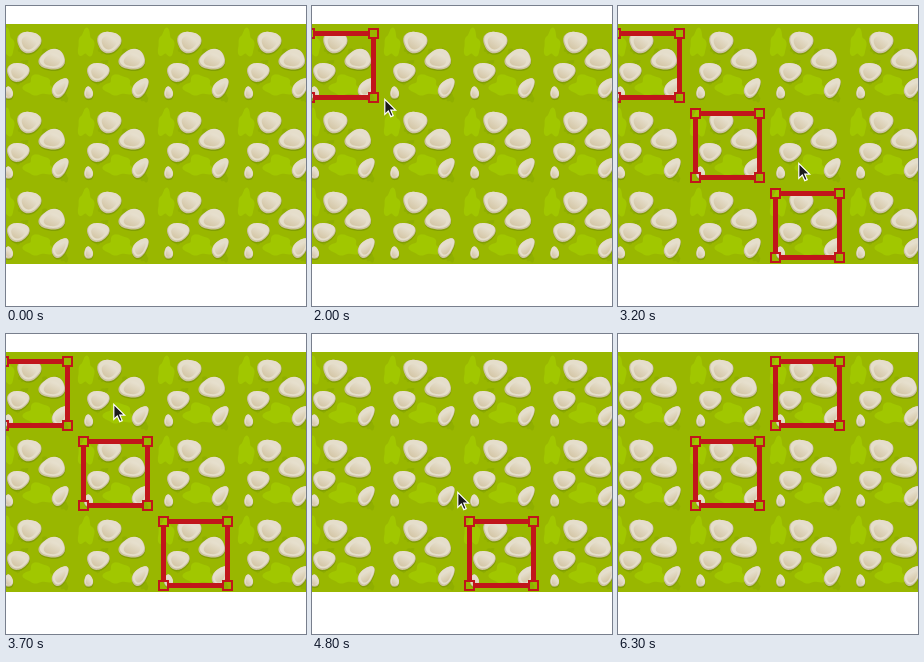
Animation of 300x300 px, one loop 6.8 s. Source, as an HTML page with a canvas:

```html
<!DOCTYPE html>
<html lang="en">
<head>
<meta charset="utf-8">
<title>Tile selection</title>
<style>
  html, body { margin: 0; width: 100%; height: 100%; overflow: hidden; background: #fff; }
  canvas { display: block; width: 300px; height: 300px; }
</style>
</head>
<body>
<canvas id="stage" width="300" height="300"></canvas>
<script>
const LOOP = 6800, STEP = 100, TILE = 80, LEFT = -10, TOP = 18, ROWS = 3, COLS = 4;
const TAU = Math.PI * 2;
const ctx = document.getElementById('stage').getContext('2d');

// Pointer visits: where it enters, then moves of [leave, arrive, x, y].
const visits = [
  { from: 300, until: 600, x: 46, y: 86, moves: [[300, 400, 58, 85]] },
  { from: 1000, until: 6300, x: 7, y: 77, moves: [
    [1000, 1300, 40, 73],
    [1800, 2200, 104, 111],
    [2400, 2600, 161, 176],
    [2600, 2800, 167, 198],
    [3100, 3300, 192, 113],
    [3400, 3700, 107, 69],
    [3800, 4100, 46, 90],
    [4300, 4700, 145, 157],
    [4900, 5000, 168, 198],
    [5100, 5300, 174, 160],
    [5400, 5600, 168, 62],
    [5700, 6000, 120, 115],
    [6100, 6200, 97, 16]
  ] }
];

// Each click toggles the tile under the pointer.
const clicks = [1500, 2300, 3000, 4200, 4800, 5100, 5700, 6100];

const stones = [
  { x: 23, y: 36, rx: 12, ry: 10.7, tilt: 0, corner: 1.75 },
  { x: 46.3, y: 53.7, rx: 13.2, ry: 10.2, tilt: -0.15, corner: 0.9 },
  { x: 12, y: 66, rx: 11.2, ry: 9.3, tilt: -0.1, corner: -0.25 },
  { x: 54.2, y: 82, rx: 11, ry: 6.6, tilt: -0.95, corner: 0.2 },
  { x: 2.5, y: 87, rx: 4.4, ry: 6, tilt: -0.1, corner: 0.5 }
];

function makeRandom(seed) {
  return () => (seed = (seed * 16807) % 2147483647) / 2147483647;
}

function fillShape(c, color, radius) {
  c.beginPath();
  for (let a = 0; a < TAU; a += TAU / 60) {
    const r = radius(a);
    c.lineTo(r * Math.cos(a), r * Math.sin(a));
  }
  c.closePath();
  c.fillStyle = color;
  c.fill();
}

function stoneLayer(c, s, color, scale, dx, dy) {
  c.save();
  c.translate(s.x + dx, s.y + dy);
  c.rotate(s.tilt);
  c.scale(s.rx * scale, s.ry * scale);
  fillShape(c, color, a => 1 + 0.065 * Math.cos(3 * (a - s.corner)));
  c.restore();
}

function drawStone(c, s) {
  const facet = c.createLinearGradient(-0.6, 0.7, 0.5, -0.6);
  facet.addColorStop(0, '#d5c7a8');
  facet.addColorStop(1, '#e6dfcd');
  stoneLayer(c, s, '#829e04', 1, 0.3, 1.5);
  stoneLayer(c, s, '#cdc2a4', 1, 0, 0);
  stoneLayer(c, s, '#e5decb', 0.92, 0.2, -0.8);
  stoneLayer(c, s, facet, 0.62, 0, 0.4);
}

function drawPatch(c, rand, x, y, rx, ry, color) {
  const p = rand() * TAU, q = rand() * TAU;
  c.save();
  c.translate(x, y);
  c.scale(rx, ry);
  fillShape(c, color, a => 1 + 0.16 * Math.sin(3 * a + p) + 0.12 * Math.sin(5 * a + q));
  c.restore();
}

function drawTile(c) {
  const rand = makeRandom(41);
  drawPatch(c, rand, 0, 38, 8, 13, '#a1c700');
  drawPatch(c, rand, 33, 80, 14, 10, '#a1c700');
  for (let i = 0; i < 7; i++) {
    const x = 8 + rand() * 60, y = 24 + rand() * 70;
    drawPatch(c, rand, x, y, 2 + rand() * 2, 2 + rand() * 2, '#90af00');
  }
  for (const s of stones) drawStone(c, s);
}

function makeField() {
  const field = document.createElement('canvas');
  field.width = field.height = 300;
  const c = field.getContext('2d');
  c.fillStyle = '#fff';
  c.fillRect(0, 0, 300, 300);
  c.beginPath();
  c.rect(0, TOP, 300, ROWS * TILE);
  c.clip();
  c.fillStyle = '#99b700';
  c.fillRect(0, TOP, 300, ROWS * TILE);
  for (let i = 0; i < ROWS * COLS; i++) {
    c.save();
    c.translate((i % COLS) * TILE, Math.floor(i / COLS) * TILE);
    drawTile(c);
    c.restore();
  }
  return field;
}

function pointerAt(t) {
  const visit = visits.find(v => t >= v.from && t < v.until);
  if (!visit) return null;
  let { x, y } = visit;
  for (const [leave, arrive, toX, toY] of visit.moves) {
    const f = Math.min(1, Math.max(0, (t - leave) / (arrive - leave)));
    x += (toX - x) * f;
    y += (toY - y) * f;
  }
  return { x: Math.round(x), y: Math.round(y) };
}

function selectedAt(t) {
  const selected = new Set();
  for (const click of clicks.filter(k => k <= t)) {
    const { x, y } = pointerAt(click);
    const tile = Math.floor((y - TOP) / TILE) * COLS + Math.floor((x - LEFT) / TILE);
    if (!selected.delete(tile)) selected.add(tile);
  }
  return selected;
}

function drawFrame(tile) {
  const r = 32, h = 4.5, gap = h + 1;
  ctx.save();
  ctx.translate(29.5 + (tile % COLS) * TILE, 59.5 + Math.floor(tile / COLS) * TILE);
  ctx.strokeStyle = '#c1151b';
  for (let side = 0; side < 4; side++) {
    ctx.lineWidth = 5;
    ctx.beginPath();
    ctx.moveTo(-r + gap, -r);
    ctx.lineTo(r - gap, -r);
    ctx.stroke();
    ctx.lineWidth = 2;
    ctx.strokeRect(-r - h, -r - h, 2 * h, 2 * h);
    ctx.rotate(Math.PI / 2);
  }
  ctx.restore();
}

const arrow = new Path2D('M.8 1.4V16.4L4.3 13L6.8 18.6L9.2 17.6L6.8 12.2H11.6Z');

function drawPointer({ x, y }) {
  ctx.save();
  ctx.translate(x, y);
  ctx.fillStyle = '#1c1c1c';
  ctx.fill(arrow);
  ctx.lineWidth = 1.2;
  ctx.strokeStyle = '#fff';
  ctx.stroke(arrow);
  ctx.restore();
}

const field = makeField();
const start = performance.now();

function render(now) {
  const t = Math.floor((Math.max(0, now - start) % LOOP) / STEP) * STEP;
  ctx.drawImage(field, 0, 0);
  selectedAt(t).forEach(drawFrame);
  const pointer = pointerAt(t);
  if (pointer) drawPointer(pointer);
  requestAnimationFrame(render);
}
render(start);
</script>
</body>
</html>
```
